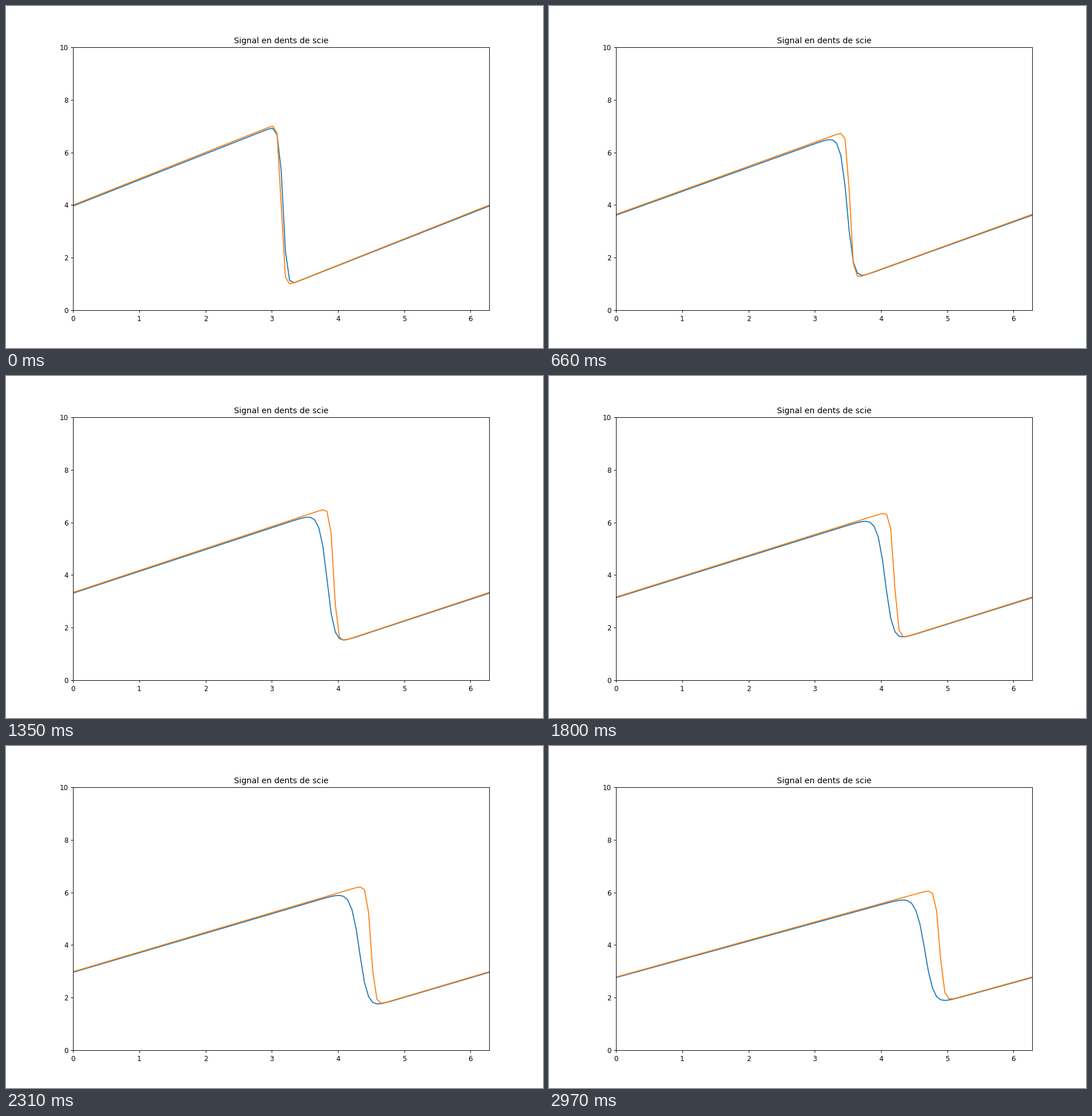
These frames come from a looping animation (938 px wide and 597 px high, 3000 ms). A matplotlib script:

```python
import numpy as np
import matplotlib.pyplot as plt
from matplotlib.animation import FuncAnimation

DPI = 256 / 3
FRAMES = 100
NX = 101
NU = 0.07

x = np.linspace(0, 2 * np.pi, NX)
dx = x[1] - x[0]
dt = dx * NU


def exact(t):
    """Analytical sawtooth solution of Burgers' equation."""
    a = x - 4 * t
    b = a - 2 * np.pi
    ea, eb = (np.exp(-s**2 / (4 * NU * (t + 1))) for s in (a, b))
    return 4 + (a * ea + b * eb) / ((t + 1) * (ea + eb))


def step(u):
    """Upwind convection plus central diffusion, periodic in x."""
    v = u[:-1]
    left, right = np.roll(v, 1), np.roll(v, -1)
    new = (v - v * dt / dx * (v - left)
           + NU * dt / dx**2 * (right - 2 * v + left))
    return np.append(new, new[0])


# The numerical solution starts two steps ahead of the analytical one.
states = [step(step(exact(0)))]
while len(states) < FRAMES:
    states.append(step(states[-1]))

fig, ax = plt.subplots(figsize=(938 / DPI, 597 / DPI), dpi=DPI)
ax.set(xlim=(0, 2 * np.pi), ylim=(0, 10), title="Signal en dents de scie")
computed, = ax.plot(x, states[0])
analytical, = ax.plot(x, exact(0))


def update(i):
    computed.set_ydata(states[i])
    analytical.set_ydata(exact(i * dt))
    return computed, analytical


anim = FuncAnimation(fig, update, frames=FRAMES, interval=30, repeat=True)
plt.show()
```
